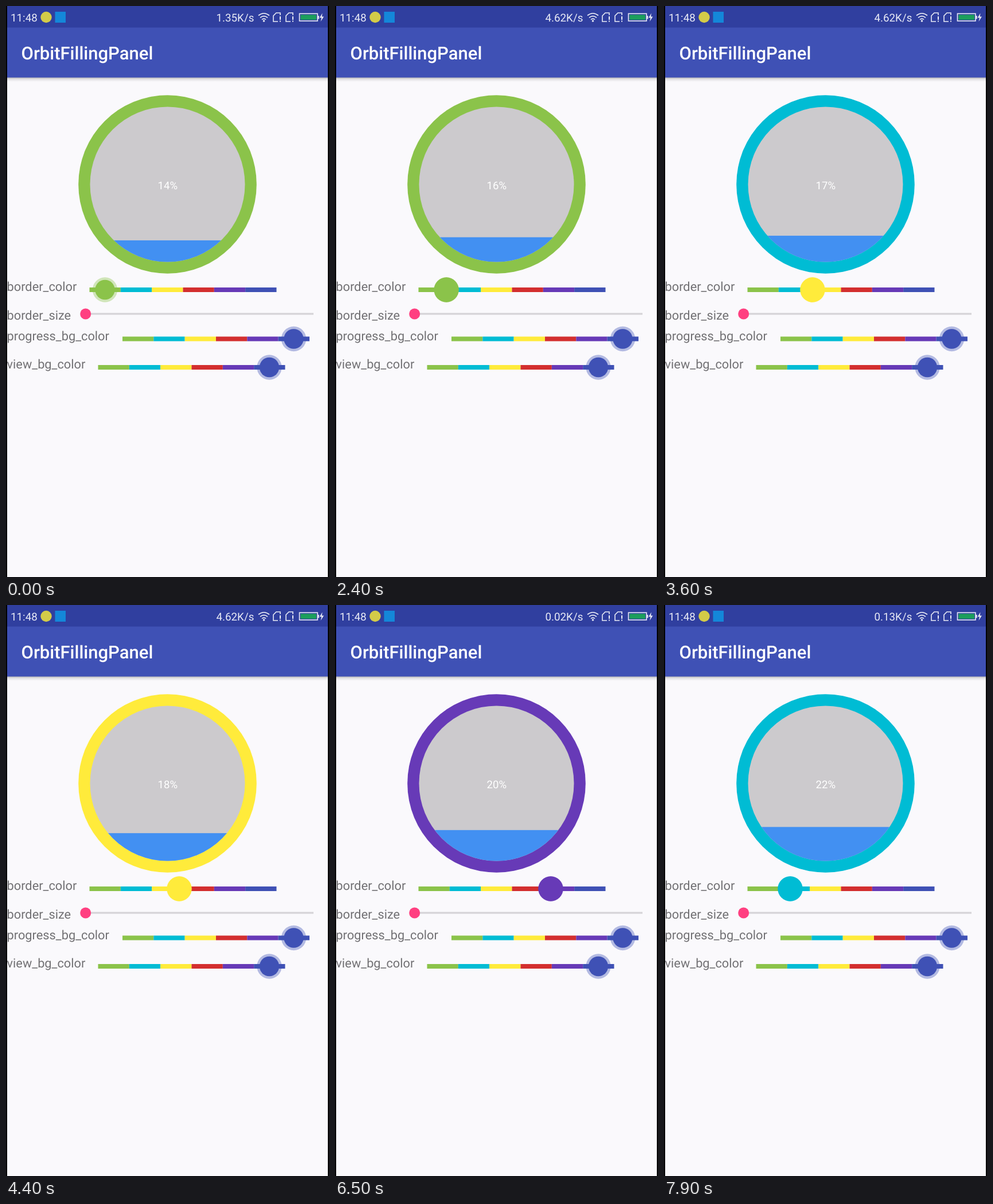
Recreate the animation shown at these times as an HTML page. Size 563 by 994 pixels, loop 8 s.

```html
<!DOCTYPE html>
<html lang="en">
<head>
<meta charset="utf-8">
<title>Progress dial</title>
<style>
  html, body { margin: 0; width: 100%; height: 100%; overflow: hidden; background: #faf9fc; }
  svg { display: block; width: 100vw; height: 100vh; }
  text { font-family: Roboto, sans-serif; text-rendering: geometricPrecision; }
  .status { font-size: 18.8px; fill: #e9ebf6; }
  .title { font-size: 31px; font-weight: 500; fill: #fff; }
  .label { font-size: 21.8px; fill: #727174; }
  .percent { font-size: 18.6px; fill: #fff; text-anchor: middle; }
  .line { fill: none; stroke: #e9ebf6; stroke-width: 1.6; }
</style>
</head>
<body>
<svg viewBox="0 0 563 994">
  <defs>
    <linearGradient id="shade" x2="0" y2="1">
      <stop offset="0" stop-color="#000" stop-opacity=".3"/>
      <stop offset=".4" stop-color="#000" stop-opacity=".1"/>
      <stop offset="1" stop-color="#000" stop-opacity="0"/>
    </linearGradient>
    <clipPath id="bowl"><circle cx="281.5" cy="310.5" r="135"/></clipPath>
    <g id="sim">
      <path class="line" d="M13 5V1H6L1 6V16H9"/>
      <path d="M12 7h2v6h-2zM12 14.5h2v2h-2z" fill="#e9ebf6"/>
    </g>
  </defs>

  <rect width="563" height="994" fill="#faf9fc"/>
  <rect y="124" width="563" height="8" fill="url(#shade)"/>
  <rect y="37" width="563" height="87.5" fill="#3f51b5"/>
  <rect width="563" height="37.5" fill="#303f9f"/>

  <text class="status" x="8" y="27">11:48</text>
  <circle cx="70" cy="19.5" r="9.7" fill="#d3cb48"/>
  <rect x="85.5" y="10" width="18.5" height="19" fill="#1487d9"/>
  <text class="status" id="speed" x="366.5" y="27"></text>
  <g class="line">
    <path d="M440 16.5Q449.500 9 459 16.500M443 20.300Q449.500 15 456 20.300M446 23.600Q449.500 20.500 453 23.600"/>
    <circle cx="449.5" cy="26" r="1"/>
    <rect x="511.5" y="13.300" width="31.500" height="12.700"/>
  </g>
  <use href="#sim" x="465" y="11"/>
  <use href="#sim" x="487" y="11"/>
  <rect x="513.5" y="15.300" width="27.500" height="8.700" fill="#1c9e5c"/>
  <path d="M543.500 17h2.200v5.500h-2.200zM551.500 12.500L546.500 20.500H550L548.500 27L554 18.500H550.500Z" fill="#e9ebf6"/>

  <text class="title" x="26.5" y="93">OrbitFillingPanel</text>

  <circle id="rim" cx="281.5" cy="310.5" r="155.3"/>
  <g clip-path="url(#bowl)">
    <rect x="140" y="170" width="283" height="283" fill="#cccacd"/>
    <rect id="water" x="140" width="283" height="160" fill="#4290f2"/>
  </g>
  <text class="percent" id="percent" x="281.8" y="318.6"></text>

  <text class="label" x="1.5" y="496">border_color</text>
  <text class="label" x="1.5" y="545.5">border_size</text>
  <text class="label" x="1.5" y="581.5">progress_bg_color</text>
  <text class="label" x="1.5" y="631">view_bg_color</text>

  <rect x="139" y="534.300" width="397" height="3.200" fill="#d6d4d8"/>
  <circle cx="138.700" cy="536" r="9.500" fill="#ff4081"/>
  <g id="sliders"></g>

  <path d="M0 0H2V994H0ZM561 0H563V994H561Z" fill="#000"/>
</svg>
<script>
const LOOP = 8000, STEP = 100, SEG = 54.33, BAR_X = 145.5;
const COLORS = ['#8bc34a', '#00bcd4', '#ffeb3b', '#d32f2f', '#673ab7', '#3f51b5'];
const DRAG = [[2000, 172.5], [3100, 232], [4400, 302], [5500, 367], [6000, 394],
              [6200, 394], [6800, 358], [7300, 309], [7900, 220]];
const SPEEDS = ['1.35K/s', '4.62K/s', '0.02K/s', '0.13K/s'];
const PRESS = 2100;
const $ = id => document.getElementById(id);

function add(tag, attrs) {
  const el = document.createElementNS('http://www.w3.org/2000/svg', tag);
  for (const k in attrs) el.setAttribute(k, attrs[k]);
  return $('sliders').appendChild(el);
}

function slider(x, cy, thumbX, color) {
  COLORS.forEach((fill, i) => add('rect', { x: x + i * SEG, y: cy - 4, width: SEG, height: 8, fill }));
  const thumb = { cx: thumbX, cy, fill: color };
  return [add('circle', { ...thumb, r: 21.7, opacity: .38 }), add('circle', { ...thumb, r: 17.2 })];
}

const [halo, knob] = slider(BAR_X, 494, 172.5, COLORS[0]);
slider(203, 579.5, 501.5, COLORS[5]);
slider(160.5, 629, 459, COLORS[5]);

function dragX(t) {
  if (t <= DRAG[0][0]) return DRAG[0][1];
  const i = DRAG.findIndex(p => p[0] >= t);
  const [t0, x0] = DRAG[i - 1], [t1, x1] = DRAG[i];
  return x0 + (x1 - x0) * (t - t0) / (t1 - t0);
}

const colorAt = x => COLORS[Math.floor((x - BAR_X) / SEG)];

function draw(t) {
  const x = dragX(t), down = t >= PRESS;
  for (const el of [halo, knob]) {
    el.setAttribute('cx', x);
    el.setAttribute('fill', colorAt(x));
  }
  knob.setAttribute('r', down ? 21.7 : 17.2);
  // the rim follows the thumb one step late
  $('rim').setAttribute('fill', colorAt(dragX(t - STEP)));

  const percent = 14 + Math.floor((t + 200) / 1000);
  $('percent').textContent = percent + '%';
  $('water').setAttribute('y', 445.6 - 2.69 * percent);
  $('speed').textContent = SPEEDS[Math.floor((t + 1300) / 3000)];
}

const start = performance.now();
function tick() {
  const t = (performance.now() - start) % LOOP;
  draw(Math.floor(t / STEP) * STEP);
  requestAnimationFrame(tick);
}
tick();
</script>
</body>
</html>
```
